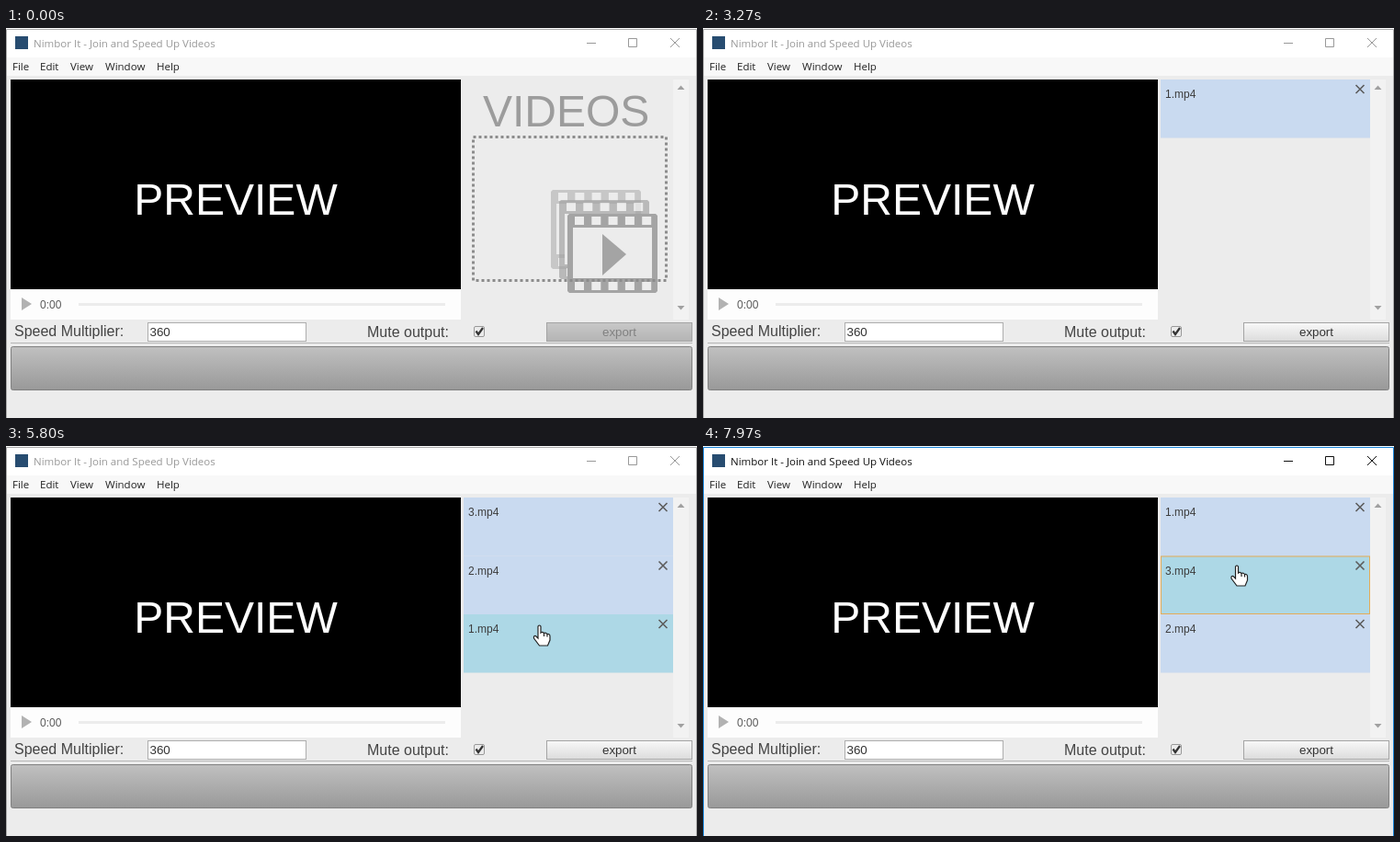
Write an HTML page that moves like this. It is 752 px wide and 424 px high and loops after 8 s.

```html
<!DOCTYPE html>
<html lang="en">
<head>
<meta charset="utf-8">
<title>Video joiner</title>
<style>
html, body { margin: 0; width: 752px; height: 424px; overflow: hidden; background: #ececec; }
svg { display: block; font-family: "Liberation Sans", Arial, sans-serif; }
.ui { font: 11.5px "Open Sans", "Noto Sans", sans-serif; }
.chrome { --ink: #999; --edge: #aaa; }
.chrome.active { --ink: #111; --edge: #1883d7; }
.chrome text { fill: var(--ink); }
.chrome path { fill: none; stroke: var(--ink); }
.chrome .edge { stroke: var(--edge); }
</style>
</head>
<body>
<svg width="752" height="424" viewBox="0 0 752 424">
  <defs>
    <linearGradient id="bar" x2="0" y2="1"><stop stop-color="#c0c0c0"/><stop offset="1" stop-color="#999"/></linearGradient>
    <linearGradient id="on" x2="0" y2="1"><stop stop-color="#f8f8f8"/><stop offset="1" stop-color="#dcdcdc"/></linearGradient>
    <linearGradient id="off" x2="0" y2="1"><stop stop-color="#c8c8c8"/><stop offset="1" stop-color="#b4b4b4"/></linearGradient>
    <g id="film">
      <path fill-rule="evenodd" d="M2 0H96L98 2V84L96 86H2L0 84V2ZM6 15V70H92V15Z"/>
      <path d="M8 7.500H92M8 78.500H92" stroke="#ececec" stroke-width="9" stroke-dasharray="10 8.300"/>
    </g>
    <path id="x" d="M-4.500 -4.500L4.500 4.500M4.500 -4.500L-4.500 4.500" fill="none" stroke="#5c5c5c" stroke-width="1.600"/>
  </defs>

  <rect width="752" height="424" fill="#ececec"/>
  <rect width="752" height="32" fill="#fff"/>
  <rect y="32" width="752" height="20" fill="#f8f8f8"/>
  <g id="chrome" class="chrome">
    <rect x="10" y="9" width="14" height="14" fill="#274c70"/>
    <text class="ui" x="30" y="21">Nimbor It - Join and Speed Up Videos</text>
    <path d="M632 16.500H642M677.500 11.500H686.500V20.500H677.500ZM723 11L733 21M733 11L723 21"/>
    <path class="edge" d="M.5 424V1.500H751.500V424"/>
  </g>
  <g class="ui" fill="#222">
    <text x="7" y="46">File</text><text x="37" y="46">Edit</text><text x="70" y="46">View</text>
    <text x="108" y="46">Window</text><text x="164" y="46">Help</text>
  </g>

  <rect x="5" y="56" width="490" height="228" fill="#000"/>
  <text x="250" y="203" font-size="48" text-anchor="middle" fill="#fff">PREVIEW</text>
  <rect x="5" y="284" width="490" height="33" fill="#fdfdfd"/>
  <path d="M17 293L28 300L17 307Z" fill="#b2b2b2"/>
  <text x="37" y="304.500" font-size="12" fill="#5c5c5c">0:00</text>
  <path d="M79 300.500H478" stroke="#ececec" stroke-width="3"/>

  <rect x="726" y="56" width="17" height="261" fill="#f2f2f2"/>
  <path d="M730.500 67L734.500 62.500L738.500 67ZM730.500 302L734.500 306.500L738.500 302Z" fill="#a0a0a0"/>

  <g id="drop">
    <text id="heading" x="519" y="107" font-size="48">VIDEOS</text>
    <g fill="#a4a4a4">
      <use href="#film" x="593" y="176" opacity=".5"/>
      <rect x="608" y="203" width="82" height="56" fill="#ececec"/>
      <use href="#film" x="602" y="187" opacity=".7"/>
      <rect x="611" y="202" width="98" height="86" fill="#ececec"/>
      <use href="#film" x="611" y="202"/>
      <path d="M649 224L675 246L649 269Z"/>
    </g>
    <rect x="508.500" y="118.500" width="210" height="156" fill="none" stroke="#8c8c8c" stroke-width="3" stroke-dasharray="3 3"/>
  </g>
  <g id="list"></g>

  <path d="M5 342.500H747" stroke="#b4b4b4"/>
  <g font-size="16" fill="#444">
    <text x="9" y="335">Speed Multiplier:</text><text x="393" y="336">Mute output:</text>
  </g>
  <rect x="154.500" y="320.500" width="172" height="20" fill="#fff" stroke="#adadad"/>
  <text x="156.500" y="335" font-size="13.330" fill="#333">360</text>
  <rect x="509.500" y="324.500" width="11" height="11" rx="1.500" fill="#ebebeb" stroke="#999"/>
  <path d="M511.500 329.500L514 333L519 326" fill="none" stroke="#333" stroke-width="2.200"/>
  <rect id="btn" x="588.500" y="320.500" width="158" height="20" stroke="#a4a4a4"/>
  <text id="btnText" x="667.500" y="335" font-size="13.330" text-anchor="middle">export</text>
  <rect x="5.500" y="346.500" width="741" height="47" rx="2" fill="url(#bar)" stroke="#808080"/>

  <g id="ghost" opacity=".75"></g>
  <g id="files">
    <rect x="-50" y="-91" width="104" height="104" rx="2" fill="#7d99a8" opacity=".4"/>
    <rect x="-52" y="-93" width="104" height="104" rx="2" fill="#d3e8f5" opacity=".85"/>
    <g id="clip">
      <rect x="-47" y="-55" width="81" height="50" fill="#6c6c6c"/>
      <path d="M-42.500 -52V-6M29.500 -52V-6" stroke="#e4e8ea" stroke-width="5" stroke-dasharray="5 4"/>
      <rect x="-38" y="-53" width="63" height="46" fill="#f9fbfc" stroke="#484848"/>
      <path id="scrawl" fill="none"/>
      <rect x="16" y="-22" width="19" height="19" rx="2" fill="#e9c440"/>
    </g>
    <g id="badge">
      <rect x="-9" y="-49" width="15" height="15" fill="#1272b8"/>
      <text x="-1.500" y="-37" font-size="12" font-weight="bold" text-anchor="middle" fill="#fff">2</text>
    </g>
    <rect x="10.500" y="13.500" width="57" height="18" fill="#fff" stroke="#a0a0a0"/>
    <path d="M14 22.500H25M20 17.500L25 22.500L20 27.500" fill="none" stroke="#39539f" stroke-width="1.300"/>
    <text class="ui" x="31" y="26.500" fill="#2840a0">Move</text>
  </g>
  <g id="arrow" fill="#fff" stroke="#222">
    <path d="M0 0V16L3.800 12.500L6.500 19L9.300 17.800L6.600 11.700H11.500Z"/>
    <rect id="dragBox" x="3.500" y="17.500" width="11" height="7" stroke-dasharray="2 1"/>
  </g>
  <path id="hand" fill="#fff" stroke="#222" stroke-width="1.200"
    d="M-1.500 1Q0 -1 1.500 1V8Q3 6.500 5 8.500Q7 7.500 8.500 9.500Q11.500 9 11.500 12V16L9 22H0L-6 14Q-6.500 11 -4 11.500L-1.500 14ZM5 8.500V12M8.500 9.500V12.500"/>
</svg>
<script>
const $ = id => document.getElementById(id);
const rows = [56, 119.5, 183];
const plain = '#c9daf0', hovered = '#add8e6';

// time, x, y of the pointer tip
const track = [
  [1030, 735, -10], [1430, 697, 106], [1830, 697, 106], [1970, 674, 121], [2030, 674, 121], [2230, 775, 126],
  [3800, 740, -15], [4370, 605, 69], [4700, 605, 69], [5070, 589, 178], [5430, 586, 186],
  [6170, 575, 204], [6270, 575, 204], [6400, 581, 77], [6550, 585, 67], [6750, 585, 67], [7030, 578, 60],
  [7700, 596, 180], [7870, 596, 180], [7970, 581, 130]
];

function pointer(t) {
  const i = track.findIndex(k => k[0] > t);
  if (i < 1) return i ? track[track.length - 1].slice(1) : track[0].slice(1);
  const [t0, x0, y0] = track[i - 1], [t1, x1, y1] = track[i];
  const p = (t - t0) / (t1 - t0);
  return [x0 + (x1 - x0) * p, y0 + (y1 - y0) * p];
}

function item(n, x, y, fill, focus) {
  return `<g transform="translate(${x} ${y})">
    <rect width="228" height="63.500" fill="${fill}"/>
    ${focus ? '<rect x=".5" y=".5" width="227" height="62.500" fill="none" stroke="#e5ac58"/>' : ''}
    <text x="5" y="20" font-size="12" fill="#3c3c3c">${n}.mp4</text>
    <use href="#x" x="217" y="10.500"/></g>`;
}

const show = (id, on) => $(id).setAttribute('display', on ? 'inline' : 'none');
const place = (id, x, y) => $(id).setAttribute('transform', `translate(${x} ${y})`);
const within = (t, a, b) => t >= a && t < b;

function order(t) {
  if (t < 2070) return [];
  if (t < 4700) return [1];
  if (t < 6750) return [3, 2, 1];
  return t < 7750 ? [3, 1, 2] : [1, 3, 2];
}

function focusRow(t) {
  if (t < 6170) return -1;
  if (t < 6750) return 2;
  return within(t, 7030, 7750) ? 0 : 1;
}

// the highlight trails the pointer slightly
function hoverRow(t) {
  return t < 4700 ? -1 : Math.floor((pointer(t - 100)[1] - rows[0]) / 63.5);
}

function draw(t) {
  const [x, y] = pointer(t), names = order(t), focus = focusRow(t), hover = hoverRow(t);
  const first = within(t, 1030, 2030), second = within(t, 3800, 4630);
  const lift = within(t, 6270, 6750), lower = within(t, 7060, 7750);
  const inStage = within(t, 1030, 2230) || t >= 3800;
  const hand = t >= 4700 && !lift && !lower;

  $('chrome').classList.toggle('active', t >= 6150);
  show('drop', !names.length);
  $('heading').setAttribute('fill', within(t, 1100, 2070) ? '#7c7c7c' : '#9c9c9c');
  $('btn').setAttribute('fill', names.length ? 'url(#on)' : 'url(#off)');
  $('btnText').setAttribute('fill', names.length ? '#333' : '#808080');

  $('list').innerHTML = names.map((n, i) =>
    item(n, 498, rows[i], i === hover ? hovered : plain, i === focus)).join('');
  $('ghost').innerHTML = lift ? item(1, x - 77, y - 21, plain)
    : lower ? item(3, x - 80, y - 4, plain) : '';

  show('files', first || second);
  show('badge', second);
  place('clip', 0, second ? 8.5 : 0);
  $('scrawl').setAttribute('d', first
    ? 'M-37 -48L-32 -27L-30 -48M-27 -47L-28 -28M-18 -45Q-25 -49 -24 -35Q-23 -23 -17 -29'
    : 'M-33 -39V-27M-28 -38V-26Q-20 -26 -21 -34Q-23 -39 -29 -38M-12 -39H-18V-27H-12M-18 -33H-13');
  $('scrawl').setAttribute('stroke', first ? '#555' : '#9a9a9a');
  show('arrow', inStage && !hand);
  show('dragBox', lift || lower);
  show('hand', hand);
  for (const id of ['files', 'arrow', 'hand']) place(id, x, y);
}

const start = performance.now();
function tick() {
  draw((performance.now() - start) % 8000);
  requestAnimationFrame(tick);
}
tick();
</script>
</body>
</html>
```
